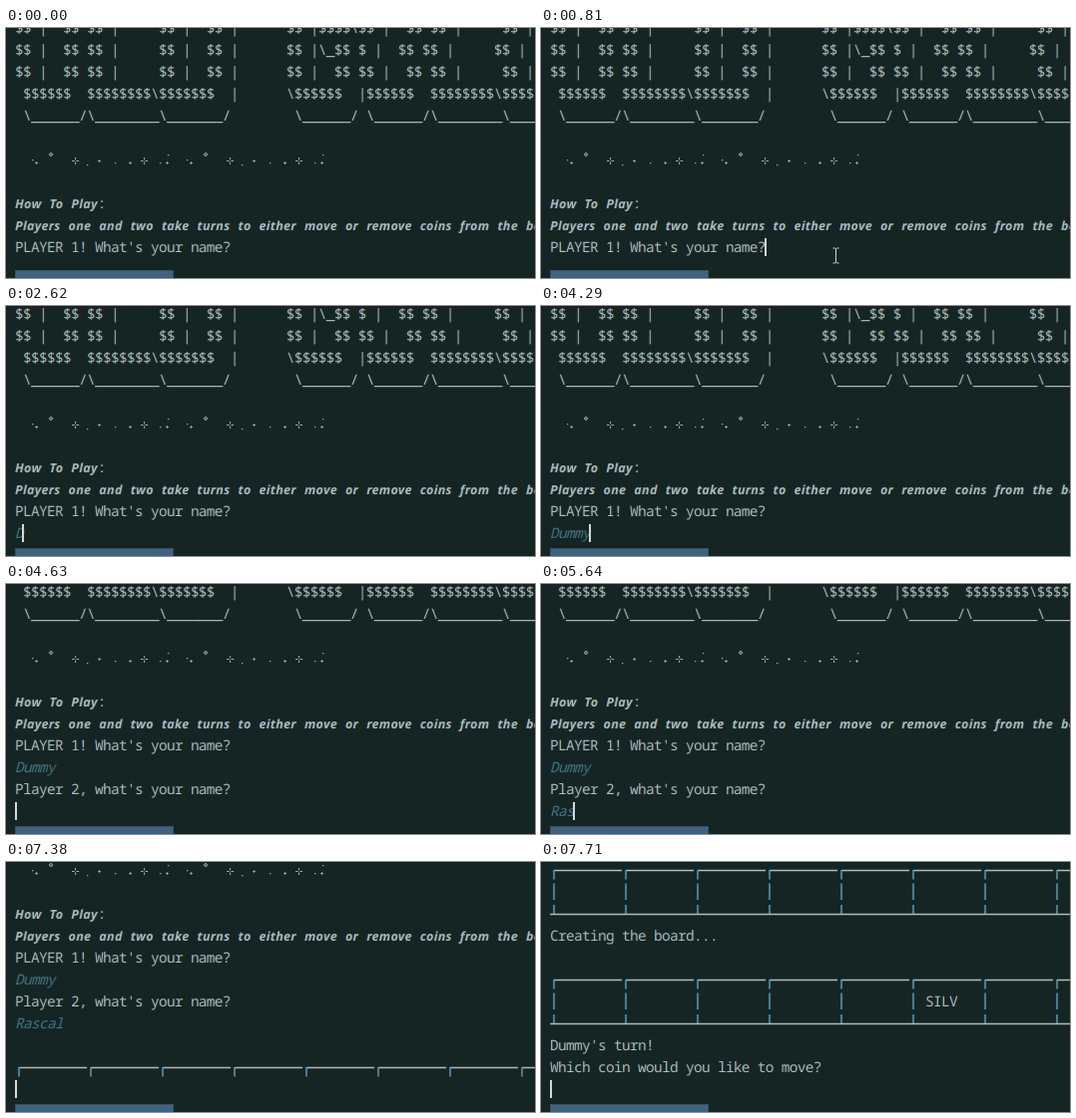
Animation, 530 px wide and 251 px high, one loop 8000 ms. Source, as an HTML page:

```html
<!DOCTYPE html>
<html lang="en">
<head>
<meta charset="utf-8">
<title>Coin game in a terminal</title>
<style>
html, body { margin: 0; width: 100%; height: 100%; overflow: hidden; background: #152523; }
svg { display: block; width: 530px; height: 251px; }
text, .mono { font: 500 14.4px "Noto Sans Mono", monospace; letter-spacing: -.64px; }
text { white-space: pre; text-rendering: geometricPrecision; fill: #aab4bc; }
.rule { font: italic bold 12.5px "Noto Sans", sans-serif; letter-spacing: .3px; word-spacing: 4.5px; }
.typed { font-style: italic; font-weight: 400; fill: #325f72; }
use { mix-blend-mode: screen; }
</style>
</head>
<body>
<svg viewBox="0 0 530 251">
  <defs id="defs"><g id="page"></g></defs>
  <rect width="530" height="251" fill="#152523"/>
  <g id="screen"></g>
  <rect id="caret" width="2" height="18" fill="#d3d8d7"/>
  <rect x="9.5" y="243.5" width="158" height="9" fill="#40617f" stroke="#33526b"/>
  <path id="mouse" d="M-3-7.5h2.2l.8.8.8-.8H3M0-6.7V6.7M-3 7.5h2.2l.8-.8.8.8H3" fill="none" stroke="#d0d5d3"/>
</svg>
<script>
const LOOP = 8000, LEFT = 9, CELL = 8, LINE = 22, INPUT_Y = 228;
const NS = 'http://www.w3.org/2000/svg';
const $ = id => document.getElementById(id);
const rows = [];

function add(parent, tag, attrs, text) {
  const el = document.createElementNS(NS, tag);
  for (const k in attrs) el.setAttribute(k, attrs[k]);
  if (text) el.textContent = text;
  return parent.appendChild(el);
}

// Subpixel colour fringes: each channel is drawn a third of a pixel apart.
['red', 'green', 'blue'].forEach((id, i) => {
  const filter = add($('defs'), 'filter', {
    id, filterUnits: 'userSpaceOnUse', x: -5, y: -5, width: 540, height: 261,
    'color-interpolation-filters': 'sRGB'
  });
  const keep = [0, 1, 2].map(c => [0, 1, 2, 3, 4].map(k => +(c === i && k === i)).join(' '));
  add(filter, 'feColorMatrix', { values: keep.join(' ') + ' 0 0 0 1 0' });
  add($('screen'), 'use', { href: '#page', filter: `url(#${id})`, transform: `translate(${(1 - i) / 3} 0)` });
});

function row(index, from = 0) {
  const g = add($('page'), 'g', { transform: `translate(0 ${index * LINE})` });
  rows.push({ g, from });
  return g;
}

function line(index, text, from, cls = '', col = 0) {
  return add(row(index, from), 'text', { x: LEFT + col * CELL, y: 5, class: cls }, text);
}

function sparkles(index) {
  const g = row(index);
  const dots = [[26, 0], [81, 5], [109, 3], [154, 3], [162, -5]];
  const pluses = [[30.5, 3.5], [124.5, 3.5], [161.5, 3.5], [93.5, 1.5]];
  for (const dx of [0, 155]) {
    const part = add(g, 'g', { transform: `translate(${dx} 0)`, fill: '#b5b2ae' });
    for (const [x, y] of dots) add(part, 'rect', { x, y, width: 1.2, height: 1.2 });
    for (const [x, y] of pluses)
      add(part, 'path', { d: `M${x - 1.5} ${y}h3M${x} ${y - 1.5}v3`, stroke: '#a5a5a5', 'stroke-width': .8 });
    add(part, 'circle', { cx: 45, cy: -5, r: 1.4, fill: 'none', stroke: '#a5b0b8' });
    for (const x of [69.5, 138.5])
      add(part, 'path', { d: `M${x - 3.5} 1.5h2.5m2 0h2.5M${x} -2v2.5m0 2v2.5`, stroke: '#a5a5b0' });
  }
}

// Eight cells wide plus a divider, running off the right edge.
function board(index, froms) {
  const parts = froms.map((t, i) => row(index + i, t));
  const stroke = (g, d, color) => add(g, 'path', { d, stroke: color, 'stroke-width': 1.4 });
  const flat = '#a6afaf', upright = '#5896c4';
  for (let x = 13; x < 530; x += 72) {
    stroke(parts[0], `M${x} .5H${x + 68}`, flat);
    stroke(parts[0], `M${x} 0V9.5`, upright);
    stroke(parts[1], `M${x} -8.5V8`, upright);
    stroke(parts[2], `M${x} -9V.5`, upright);
  }
  stroke(parts[2], 'M9 .5H530', flat);
}

const edge = '$$ |  $$ $$ |     $$ |  $$ |      $$ |';
const tail = '$$ |  $$ $$ |     $$ |';
line(0, edge + '$$$$\\' + tail);
line(1, edge + '\\_$$ ' + tail.replace('$$ |', '$$ |'.slice(0)));
line(2, edge + '  $$ ' + tail);
line(3, ' $$$$$$  $$$$$$$$\\$$$$$$$  |      \\$$$$$$  |$$$$$$  $$$$$$$$\\$$$$$$$');
line(4, ' \\______/\\________\\_______/        \\______/ \\______/\\________\\_______');
sparkles(6);
add(line(8, 'How To Play', 0, 'rule'), 'tspan', { class: 'mono', 'font-style': 'normal' }, ':');
line(9, 'Players one and two take turns to either move or remove coins from the board', 0, 'rule');
line(10, "PLAYER 1! What's your name?");
line(12, "Player 2, what's your name?", 4630);
board(15, [7380, 7570, 7570]);
line(18, 'Creating the board...', 7570);
board(20, [7640, 7640, 7710]);
line(21, 'SILV', 7640, '', 47);
line(23, "Dummy's turn!", 7710);
line(24, 'Which coin would you like to move?', 7710);

const names = [
  { text: 'Dummy', row: 11, keys: [2620, 3290, 3820, 3960, 4100] },
  { text: 'Rascal', row: 13, keys: [5230, 5500, 5640, 6840, 7110, 7240] }
];
for (const n of names) n.el = line(n.row, '', 0, 'typed');

// Time, row and column of the caret; the view follows its row.
const stops = [[0, 10, 27], [2620, 11, 0], [4630, 13, 0], [7380, 16, 0], [7570, 19, 0], [7640, 22, 0], [7710, 25, 0]];
const caretOn = [[810, 1280], [1760, 2280], [2620, 6380], [6840, LOOP]];
const mousePath = [[200, 284.5, 238], [470, 289.5, 237], [610, 292.5, 233], [810, 295.5, 228.5]];
const last = (list, t) => list.filter(s => s[0] <= t).pop();
const show = (el, on) => el.setAttribute('visibility', on ? 'visible' : 'hidden');

function draw(t) {
  let [, at, col] = last(stops, t);
  const scroll = t < 2620 ? 0 : at * LINE - INPUT_Y;
  $('page').setAttribute('transform', `translate(0 ${-scroll})`);
  for (const r of rows) show(r.g, t >= r.from);
  for (const n of names) {
    const count = n.keys.filter(k => k <= t).length;
    n.el.textContent = n.text.slice(0, count);
    if (n.row === at) col = count;
  }
  $('caret').setAttribute('x', LEFT + col * CELL - (col ? 1 : 0));
  $('caret').setAttribute('y', at * LINE - scroll - 9);
  show($('caret'), caretOn.some(([a, b]) => t >= a && t < b));

  const m = last(mousePath, t);
  show($('mouse'), m && t < 1080);
  if (m) $('mouse').setAttribute('transform', `translate(${m[1]} ${m[2]})`);
}

const start = performance.now();
function tick() {
  draw((performance.now() - start) % LOOP);
  requestAnimationFrame(tick);
}
tick();
</script>
</body>
</html>
```
